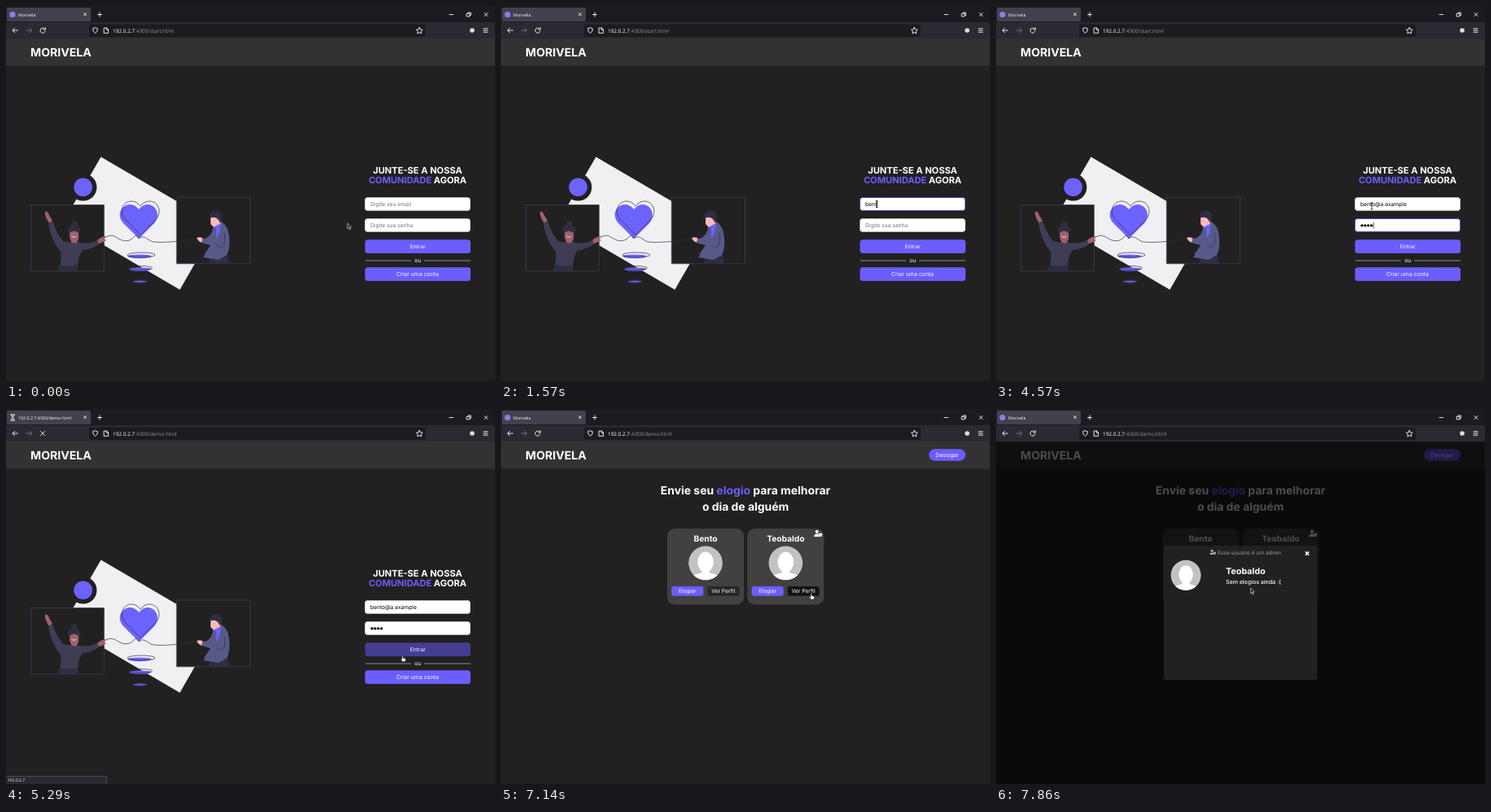
Recreate the animation shown at these times as an HTML page. Size 600 px wide and 461 px high, loop 8 s.

```html
<!DOCTYPE html>
<html lang="pt-BR">
<head>
<meta charset="utf-8">
<title>Morivela</title>
<style>
  html, body { margin: 0; width: 100%; height: 100%; overflow: hidden; background: #222021; }
  svg { display: block; width: 100%; height: 100%; }
  text { font: 6.7px Inter, sans-serif; fill: #fff; text-rendering: geometricPrecision; white-space: pre; }
  .ui { font-family: "Open Sans", sans-serif; font-size: 6.4px; }
  .tab { font-size: 5.3px; }
  .bold { font-weight: 700; }
  .mid { text-anchor: middle; }
  .h1 { font-size: 13.9px; }
  .h2 { font-size: 11.1px; }
  .name { font-size: 10.2px; }
  .accent { fill: #6c5dff; }
  .hint { fill: #757575; }
  .typed { fill: #000; }
  .line { fill: none; stroke: #fbfbfe; stroke-width: .9; stroke-linecap: round; stroke-linejoin: round; }
  .dim { stroke: #77767e; }
  .field { fill: #fff; stroke: #b9b9bd; stroke-width: 1; }
  .ink { fill: none; stroke: #2f2e41; stroke-width: .7; }
</style>
</head>
<body>
<svg viewBox="0 0 600 461" preserveAspectRatio="none">
  <defs>
    <clipPath id="disc"><circle r="21"/></clipPath>
    <g id="avatar" clip-path="url(#disc)">
      <circle r="21" fill="#c3c2c3"/>
      <ellipse cy="-1" rx="9.8" ry="12.5" fill="#fff"/>
      <ellipse cy="20.5" rx="18" ry="8.5" fill="#fff"/>
      <path d="M-5 8H5V15H-5Z" fill="#fff"/>
    </g>
    <g id="admin">
      <circle cx="-1.3" cy="-2.2" r="2.1"/>
      <path d="M-4.8 4Q-5 .6 -1.5 .5L.8 .6Q.6 3 2 4Z"/>
      <path d="M3 -.6L5.2 .2Q5.2 3.4 3 4.4Q.9 3.4 .9 .2Z"/>
    </g>
  </defs>

  <rect width="600" height="461" fill="#222021"/>

  <!-- browser window -->
  <rect width="600" height="20" fill="#1c1b22"/>
  <rect x="1" y="2" width="103" height="17" rx="2" fill="#42414d"/>
  <rect y="20" width="600" height="20" fill="#2b2a33"/>
  <rect x="102" y="22.5" width="413" height="15.5" rx="2" fill="#1c1b22"/>
  <circle id="favicon" cx="8" cy="10.5" r="3.6" fill="#8a80e8"/>
  <path id="hourglass" class="line" stroke-width=".6" d="M6 7H10.5M6 14H10.5M6.7 7Q6.7 9.5 8.2 10.5Q6.7 11.5 6.7 14M9.8 7Q9.8 9.5 8.2 10.5Q9.8 11.5 9.8 14"/>
  <text id="tabTitle" class="ui tab" x="15" y="12.6"></text>
  <path class="line" stroke-width=".7" d="M95.500 8.700l3 3m0-3l-3 3M112.500 10.500h5m-2.500-2.500v5M544 10.500h4.500M565.500 9.300h3.500v3.500h-3.500zM567 9V8h3.300v3.500h-1M587 8.500l4 4m0-4l-4 4"/>
  <path class="line" d="M14.500 30H8m2.800-2.800L8 30l2.800 2.800"/>
  <path class="line dim" d="M25 30h6.500m-2.800-2.800L31.500 30l-2.800 2.800"/>
  <path id="reload" class="line" d="M47.700 28.300A3.100 3.100 0 1 0 48.100 31M48.300 26.600V29H45.900"/>
  <path id="stop" class="line" d="M42.500 27.500l5 5m0-5l-5 5"/>
  <path class="line" d="M109.500 26.800l2.900 1Q112.800 31.700 109.500 33.300Q106.200 31.700 106.600 27.800ZM120.500 27h3l2 2v4.300h-5zM123.300 27v2.200h2.200"/>
  <path class="line" d="M507.300 26.300l1.200 2.500 2.700.4-2 1.900.5 2.700-2.400-1.300-2.400 1.300.5-2.700-2-1.900 2.700-.4z"/>
  <circle cx="572" cy="30" r="2.8" fill="#dedde3"/>
  <path class="line" d="M586 27.800h5M586 30h5M586 32.200h5"/>
  <text class="ui" x="131" y="32.6">192.0.2.7<tspan id="path" fill="#96959d"></tspan></text>

  <!-- shared page header -->
  <rect y="40" width="600" height="33.500" fill="#333132"/>
  <text class="bold" style="font-size:14.1px" x="30" y="62">MORIVELA</text>

  <g id="login">
    <path d="M116.500 185.500L259 269 213.300 348.700 70.500 265Z" fill="#f0f0f2"/>
    <circle cx="94.600" cy="222.800" r="16.800" fill="#222021"/>
    <circle cx="94.600" cy="222.800" r="11.300" fill="#6c63ff"/>
    <path d="M30.500 244.500H120.300V326H30.500ZM209.300 235H299.500V316.800H209.300Z" fill="#222021" stroke="#3f3d56" stroke-width=".8"/>
    <path d="M163 286L144 267C133 255 145 240 157 245Q161 247 163 250Q165 247 169 245C181 240 192 255 182 267Z" fill="#6c63ff"/>
    <path class="ink" d="M165 281.500L146.500 262.500C136 250 147 236 159 241Q163 243 165 246Q167 243 171 241C183 236 194 250 184 262.500Z"/>
    <path class="ink" d="M121 285C130 279 134 284 140 287S153 289 157 284S162 286 163 286C169 281 172 286 178 289S210 290 237 286"/>
    <g fill="#6c63ff">
      <ellipse cx="163.800" cy="307.800" rx="14.500" ry="2.400"/>
      <ellipse cx="164.800" cy="323.600" rx="13.500" ry="2.200"/>
      <ellipse cx="164.300" cy="339" rx="8.500" ry="1.500"/>
    </g>
    <g class="ink">
      <ellipse cx="166" cy="306" rx="17" ry="3"/>
      <ellipse cx="166" cy="322" rx="13.500" ry="2.400"/>
      <ellipse cx="165" cy="338.200" rx="9" ry="1.600"/>
    </g>

    <!-- woman -->
    <path d="M53 267Q47 258 48 253Q51 251 53 257L57 264ZM112 288Q117 283 124 283L120 286 123 288Q117 292 113 292Z" fill="#9f616a"/>
    <circle cx="84" cy="268.500" r="4" fill="#2f2e41"/>
    <ellipse cx="83.500" cy="275.500" rx="8" ry="6.500" fill="#2f2e41"/>
    <path d="M78 279Q83 274 89 279Q90 287 87 290V294H80V289Q77.500 285 78 279Z" fill="#9f616a"/>
    <path d="M80.500 283Q83 286 86 283" stroke="#fff" stroke-width=".8" fill="none"/>
    <path d="M52 267L57 264Q62 280 70 289Q76 291 80 290Q84 293 88 290Q99 294 112 288L114 293Q105 299 94 300Q87 309 88 326H64Q69 312 67 302Q56 290 52 267Z" fill="#3f3d56"/>
    <path d="M66 318Q76 321 87 318L88 326H63Z" fill="#2f2e41"/>

    <!-- man -->
    <path d="M250 306H272L274 316.800H249Z" fill="#2f2e41"/>
    <path d="M251 260Q257 256 264 262L263 271 256 273 251 268ZM234 285Q240 283 243 287L241 291Q236 290 234 285Z" fill="#ffb8b8"/>
    <path d="M250 261Q248 254 256 252Q264 251 265 260L263 267 260 262Q256 258 250 261Z" fill="#2f2e41"/>
    <path d="M254 272L264 267 265 290 251 306Z" fill="#6c63ff"/>
    <path d="M264 265Q273 270 274 285Q275 298 271 306L261 312 242 309Q250 300 257 288L262 279ZM255 272L258 273 258 290 248 307 243 306 251 294Q246 293 240 291L241 286Q250 287 255 272Z" fill="#575a89"/>
    <path class="ink" d="M268 279Q270 292 265 297L258 294"/>

    <!-- form -->
    <text class="bold mid h2" x="505" y="206">JUNTE-SE A NOSSA</text>
    <text class="bold mid h2" x="505" y="218"><tspan class="accent">COMUNIDADE</tspan> AGORA</text>
    <rect id="emailBox" class="field" x="440.500" y="235.500" width="129" height="16" rx="3"/>
    <rect id="passBox" class="field" x="440.500" y="261.500" width="129" height="16" rx="3"/>
    <text id="emailHint" class="hint" x="447" y="245.700">Digite seu email</text>
    <text id="passHint" class="hint" x="447" y="271.900">Digite sua senha</text>
    <text id="email" class="typed" x="447" y="245.700"></text>
    <g id="dots"></g>
    <rect id="caret" width=".7" height="8" fill="#111"/>
    <rect id="enter" x="440.500" y="287.300" width="129.500" height="16.700" rx="3.500"/>
    <text class="mid" x="505.300" y="298.200">Entrar</text>
    <path d="M441 313H497M513 313H570" stroke="#bdbcbd" stroke-width=".7"/>
    <text class="mid" x="505.300" y="315.300">ou</text>
    <rect class="accent" x="440.500" y="321.300" width="129.500" height="16.700" rx="3.500"/>
    <text class="mid" x="505" y="332.300" style="font-size:6.9px">Criar uma conta</text>
  </g>

  <g id="home">
    <rect class="accent" x="525" y="49.300" width="45" height="14.400" rx="7.200"/>
    <text class="mid" x="547.500" y="59">Deslogar</text>
    <text class="bold mid h1" x="300" y="104.700">Envie seu <tspan class="accent">elogio</tspan> para melhorar</text>
    <text class="bold mid h1" x="300" y="124.500">o dia de alguém</text>
    <g id="cards"></g>
  </g>

  <g id="modal">
    <rect y="40" width="600" height="421" fill="#000" opacity=".7"/>
    <rect x="206" y="168" width="188" height="165" rx="3.500" fill="#222021"/>
    <use href="#admin" transform="translate(266 176) scale(.75)" fill="#aaa9aa"/>
    <text x="272" y="178.700" style="font-size:6.6px;fill:#a09fa0">Esse usuário é um admin</text>
    <path d="M379.700 175.400l4.200 4.200m0-4.200l-4.200 4.200" stroke="#fff" stroke-width="1.600"/>
    <use href="#avatar" transform="translate(233 204.300) scale(.89)"/>
    <text class="bold" style="font-size:10.7px" x="282" y="203">Teobaldo</text>
    <text style="font-size:7px;font-weight:500" x="282" y="214.500">Sem elogios ainda :(</text>
  </g>

  <g id="status">
    <rect x="-.5" y="451.500" width="124" height="10" fill="#2b2a33" stroke="#5b5a63" stroke-width=".7"/>
    <text class="ui" style="font-size:5px" x="2" y="458.300">192.0.2.7</text>
  </g>

  <g id="pointer">
    <path id="arrow" d="M0 0V6.600L1.500 5.300 2.600 7.800 3.700 7.300 2.600 4.900H4.600Z" fill="#111" stroke="#fff" stroke-width=".6"/>
    <path id="beam" d="M-1.300 -4H1.300M0 -4V4M-1.300 4H1.300" stroke="#111" stroke-width=".8"/>
    <path id="hand" d="M-.6 .4Q0 -.5 .6 .4V2.600L3.600 3.200Q4.200 4.600 3.300 7H0L-2 4.500Q-1.800 3.600 -.6 4.300Z" fill="#fff" stroke="#111" stroke-width=".4"/>
  </g>
</svg>

<script>
const LOOP = 8000, STEP = 1000 / 7;
const EMAIL = 'bento@a.example';
const LOAD = 5280, HOME = 5420, CARDS = 5560, MODAL = 7280;

// [time, value] steps
const emailKeys = [[0, 0], [1430, 2], [1570, 4], [1860, 5], [2570, 6], [2860, 7], [3000, 8],
  [3140, 10], [3290, 11], [3430, 13], [3570, 14], [3860, 15]];
const passKeys = [[0, 0], [4290, 2], [4430, 3], [4570, 4]];
const focusKeys = [[0, ''], [1290, 'email'], [3860, 'pass'], [5140, '']];
// [time, x, y] pointer path
const route = [[0, 419, 267], [1140, 461, 243.5], [4290, 461, 243.5], [4570, 461, 246], [5140, 486.5, 303.5],
  [5860, 486.5, 303.5], [7000, 380.5, 227], [7430, 380.5, 227], [7860, 312.5, 220], [LOOP, 312.5, 220]];

const $ = id => document.getElementById(id);
const show = (id, on) => { $(id).style.display = on ? '' : 'none'; };
const latest = (keys, t) => keys.filter(k => k[0] <= t + 9).pop();
const inside = ([x, y], [left, top, right, bottom]) => x >= left && x <= right && y >= top && y <= bottom;

const fields = [[441, 235, 570, 252], [441, 261, 570, 278]];
const enterArea = [440, 287, 570, 304.5];
const profileArea = [351, 218, 391, 230];

function card(x, name, id) {
  const button = (left, label, style) =>
    `<rect ${style} x="${left}" y="218" width="39" height="11.7" rx="2.5"/>
     <text class="mid" x="${left + 19.5}" y="226.2">${label}</text>`;
  return `<rect x="${x}" y="147" width="94" height="93.5" rx="9" fill="#424041"/>
    <text class="bold mid name" x="${x + 47}" y="162.8">${name}</text>
    <use href="#avatar" x="${x + 47}" y="189.3"/>
    ${button(x + 5.3, 'Elogiar', 'class="accent"')}
    ${button(x + 49.3, 'Ver Perfil', `id="${id}" fill="#282627"`)}`;
}
$('cards').innerHTML = card(204, 'Bento', 'profile1') + card(302.3, 'Teobaldo', 'profile2') +
  '<use href="#admin" x="389" y="153" fill="#fff"/>';
$('dots').innerHTML = [0, 1, 2, 3].map(i => `<circle cx="${449 + i * 3.9}" cy="269.8" r="1.65"/>`).join('');

function pointerAt(t) {
  const i = Math.max(1, route.findIndex(k => k[0] > t));
  const [t0, x0, y0] = route[i - 1], [t1, x1, y1] = route[i];
  const p = (t - t0) / (t1 - t0), e = p * p * (3 - 2 * p);
  return [x0 + (x1 - x0) * e, y0 + (y1 - y0) * e];
}

function drawForm(t, point) {
  const [emailTime, letters] = latest(emailKeys, t);
  const [passTime, dots] = latest(passKeys, t);
  const [focusTime, focus] = latest(focusKeys, t);
  $('email').textContent = EMAIL.slice(0, letters);
  show('emailHint', !letters);
  show('passHint', !dots);
  [...$('dots').children].forEach((dot, i) => { dot.style.display = i < dots ? '' : 'none'; });
  for (const name of ['email', 'pass']) {
    $(name + 'Box').style.stroke = focus === name ? '#5148c8' : '';
  }
  const onEmail = focus === 'email';
  const lastInput = Math.max(focusTime, onEmail ? emailTime : passTime);
  show('caret', focus && (t + 9 - lastInput) % 1000 < 500);
  $('caret').setAttribute('x', onEmail ? 447.2 + (letters && $('email').getComputedTextLength()) : 447.2 + dots * 3.9);
  $('caret').setAttribute('y', onEmail ? 239.3 : 265.5);
  $('enter').setAttribute('fill', inside(point, enterArea) ? '#433e91' : '#6c5dff');
}

function draw(time) {
  const t = Math.floor((time % LOOP + 5) / STEP) * STEP;
  const home = t >= HOME, loading = t >= LOAD && !home, modal = t >= MODAL;
  const point = pointerAt(t);

  show('login', !home);
  show('home', home);
  show('cards', t >= CARDS);
  show('modal', modal);
  show('status', loading);
  show('favicon', !loading);
  show('hourglass', loading);
  show('reload', !loading);
  show('stop', loading);
  $('tabTitle').textContent = loading ? '192.0.2.7:4300/demo.html' : 'Morivela';
  $('path').textContent = t >= LOAD ? ':4300/demo.html' : ':4300/start.html';

  if (!home) drawForm(t, point);
  const onProfile = home && !modal && inside(point, profileArea);
  $('profile2').setAttribute('fill', onProfile ? '#151415' : '#282627');

  const kind = !home && fields.some(f => inside(point, f)) ? 'beam'
    : onProfile || !home && inside(point, enterArea) ? 'hand' : 'arrow';
  for (const name of ['arrow', 'beam', 'hand']) show(name, name === kind);
  $('pointer').setAttribute('transform', `translate(${point})`);
}

const start = performance.now();
(function tick() {
  draw(performance.now() - start);
  requestAnimationFrame(tick);
})();
</script>
</body>
</html>
```
